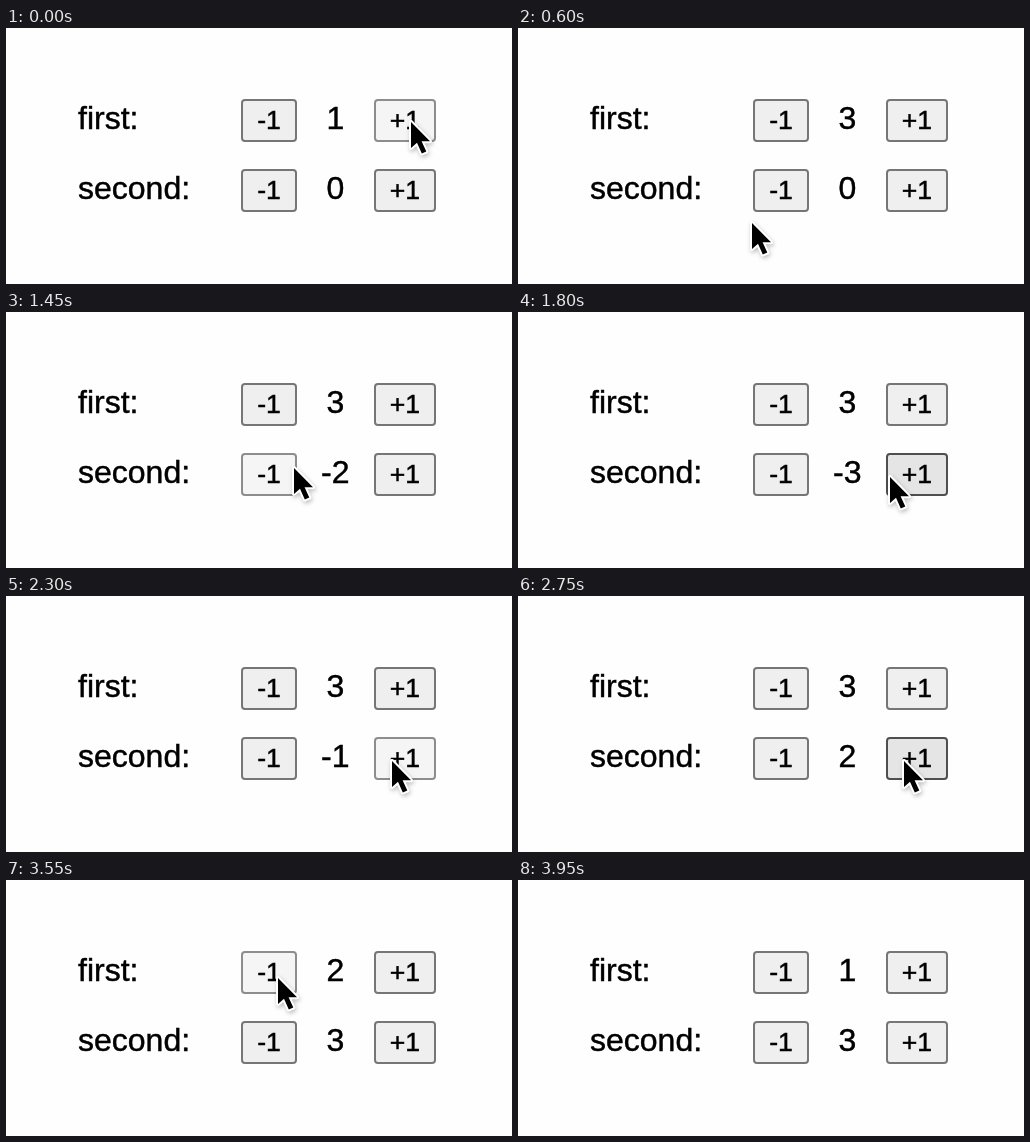
Animation of 506x256 px, one loop 4 s. Source, as an HTML page:

```html
<!DOCTYPE html>
<html lang="en">
<head>
<meta charset="utf-8">
<title>Counters</title>
<style>
  html, body { margin: 0; width: 100%; height: 100%; overflow: hidden; background: #fefefe; }
  svg { display: block; }
  text { font: 32px "Liberation Sans", Arial, sans-serif; stroke: #000; stroke-width: .45; }
  .value { text-anchor: middle; }
  .button text { font-size: 26.67px; text-anchor: middle; }
  .button rect { fill: #efefef; stroke: #767676; stroke-width: 2; }
  .button.hover rect { fill: #e5e5e5; stroke: #4f4f4f; }
  .button.active rect { fill: #f5f5f5; stroke: #8d8d8d; }
  #cursor { filter: drop-shadow(1px 2px 2px rgba(0, 0, 0, .25)); }
  #cursor path { stroke: #fff; stroke-width: 4; stroke-linejoin: round; paint-order: stroke; }
</style>
</head>
<body>
<svg width="506" height="256" viewBox="0 0 506 256">
  <g id="rows"></g>
  <g id="cursor"><path d="M0 0V26L6 20.8L10.8 31.5L15.3 29.6L10.6 19.3H19Z"/></g>
</svg>
<script>
const LOOP = 4000, STEP = 50, PRESS = 100;

// Cursor stops: time, x, y
const path = [
  [0, 405, 94], [300, 405, 94], [600, 234, 195], [700, 234, 195],
  [1000, 288, 156], [1600, 288, 156], [1800, 372, 165], [1850, 386, 165],
  [3000, 386, 165], [3200, 299, 100], [3300, 272, 98], [3700, 272, 98],
  [3900, 340, 156], [LOOP, 340, 156]
];
const cursorEnd = 3950;

// Each click counts when the button is released
const rows = [
  { label: "first:", y: 71, start: 1, minus: [3450, 3650], plus: [50, 250] },
  { label: "second:", y: 141, start: 0, minus: [1150, 1350, 1550],
    plus: [1950, 2150, 2350, 2550, 2750, 2950] }
];
const host = document.getElementById("rows");
const cursor = document.getElementById("cursor");

function add(parent, tag, attrs, text = "") {
  const node = document.createElementNS("http://www.w3.org/2000/svg", tag);
  for (const key in attrs) node.setAttribute(key, attrs[key]);
  node.textContent = text;
  return parent.appendChild(node);
}

function makeButton(x, y, width, label, clicks) {
  const node = add(host, "g", { class: "button" });
  add(node, "rect", { x: x + 1, y: y + 1, width: width - 2, height: 41, rx: 3 });
  add(node, "text", { x: x + width / 2, y: y + 30 }, label);
  return { node, x, y, width, clicks };
}

for (const row of rows) {
  add(host, "text", { x: 72, y: row.y + 30 }, row.label);
  row.value = add(host, "text", { class: "value", x: 329.3, y: row.y + 30 });
  row.buttons = [
    makeButton(235, row.y, 56, "-1", row.minus),
    makeButton(368, row.y, 62, "+1", row.plus)
  ];
}

function cursorAt(t) {
  const i = path.findIndex(stop => stop[0] > t);
  const [t0, x0, y0] = path[i - 1], [t1, x1, y1] = path[i];
  const k = (t - t0) / (t1 - t0);
  return [x0 + (x1 - x0) * k, y0 + (y1 - y0) * k];
}

function draw(now) {
  const t = Math.floor(now % LOOP / STEP) * STEP;
  const visible = t < cursorEnd;
  const [x, y] = cursorAt(t);
  const count = clicks => clicks.filter(c => c <= t).length;
  cursor.setAttribute("transform", `translate(${x} ${y})`);
  cursor.style.display = visible ? "" : "none";
  for (const row of rows) {
    row.value.textContent = row.start + count(row.plus) - count(row.minus);
    for (const b of row.buttons) {
      const hover = visible && x >= b.x && x < b.x + b.width && y >= b.y && y < b.y + 43;
      const active = b.clicks.some(c => c > t && c - t <= PRESS);
      b.node.classList.toggle("hover", hover);
      b.node.classList.toggle("active", active);
    }
  }
}

function frame() {
  draw(performance.now());
  requestAnimationFrame(frame);
}
frame();
</script>
</body>
</html>
```
